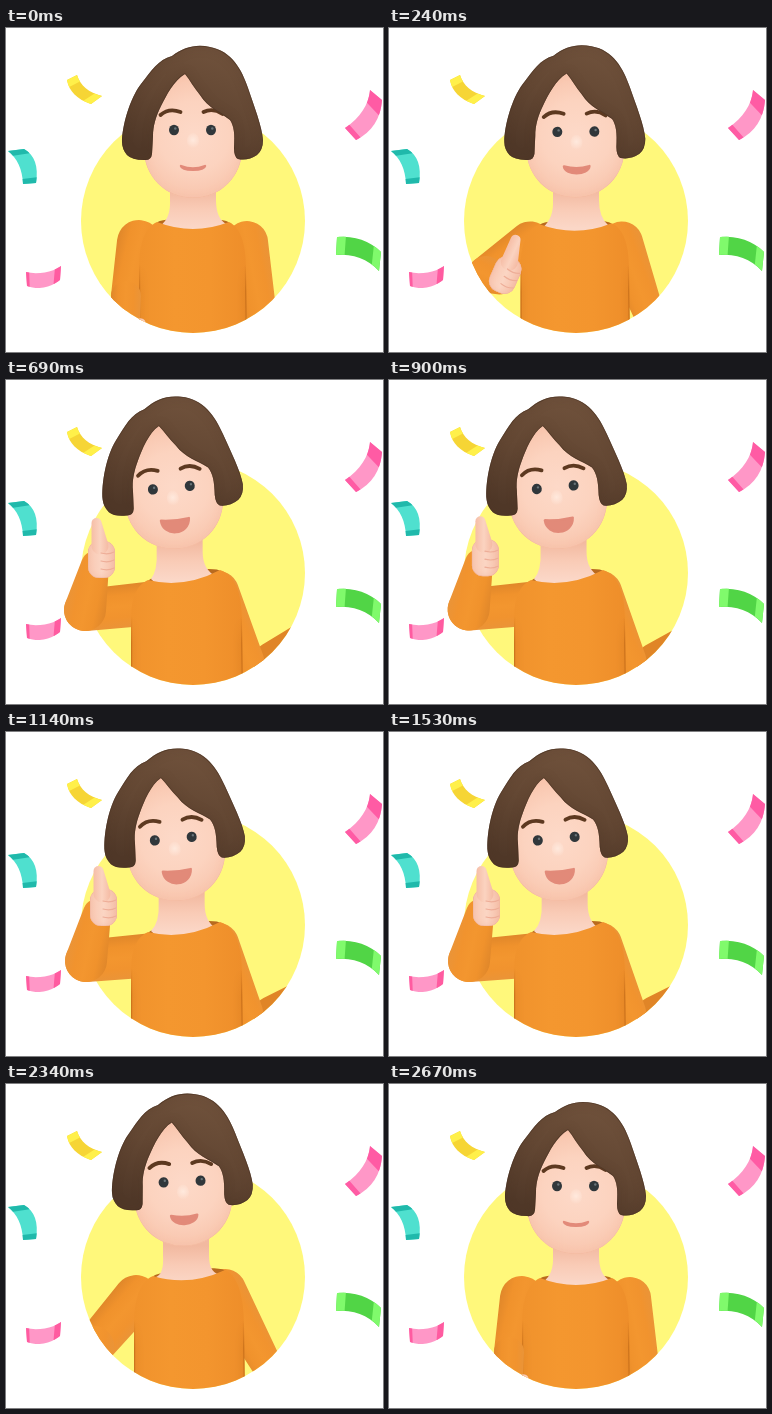
Write an HTML page with a canvas that moves like this. It is 377 by 324 pixels and loops after 2.7 s.

```html
<!DOCTYPE html>
<html lang="en">
<head>
<meta charset="utf-8">
<title>Thumbs up</title>
<style>
  html, body { margin: 0; width: 100%; height: 100%; overflow: hidden; background: #fff; }
  canvas { display: block; width: 377px; height: 324px; }
</style>
</head>
<body>
<canvas id="stage" width="377" height="324"></canvas>
<script>
const ctx = document.getElementById('stage').getContext('2d');
const LOOP = 2700;
const TAU = Math.PI * 2;

// head: dx, dy, degrees; face: dx, dy, mouth opening; collar: x, y, tilt; torso: left, right
// armL: shoulder, elbow, elbow radius; hand: x, y, degrees; armR: shoulder, elbow; foreR: two ends
const rest = {
  head: [0, 0, 0], face: [0, 0, 0], collar: [187, 194, 0], torso: [133, 240],
  armL: [133, 214, 120, 268, 15], hand: [124, 330, 24],
  armR: [241, 214, 256, 290], foreR: [256, 308, 258, 330]
};
const raise = {
  head: [-2.5, -1, -1.7], face: [2, 5, .8], collar: [186, 197, -3], torso: [129, 240],
  armL: [148, 218, 78, 229, 21], hand: [105, 179, 24],
  armR: [222, 215, 265, 286], foreR: [268, 308, 280, 322]
};
const thumbs = {
  head: [-20.5, -1, -5.5], face: [-1, 6.5, 1], collar: [178, 195, -10], torso: [125, 236],
  armL: [148, 223, 79, 230, 21], hand: [95, 179, 0],
  armR: [212, 212, 243, 280], foreR: [266, 281, 294, 264]
};
const settle = {
  head: [-18.5, -1, -5.5], face: [-1, 5.5, 1], collar: [178, 195, -10], torso: [125, 236],
  armL: [148, 223, 80, 229, 21], hand: [97, 175, 0],
  armR: [212, 212, 242, 280], foreR: [266, 283, 292, 270]
};
const lower = {
  head: [-10.5, -8, -2.7], face: [0, 3.5, .55], collar: [183, 189, -6], torso: [128, 238],
  armL: [130, 213, 88, 262, 20], hand: [86, 310, 24],
  armR: [219, 206, 263, 285], foreR: [264, 308, 276, 324]
};
const timeline = [
  [0, rest], [450, raise], [690, thumbs], [1140, settle],
  [1530, settle], [2100, settle], [2340, lower], [2670, rest], [LOOP, rest]
];

// Monotone cubic interpolation through the timeline
function poseAt(time) {
  const last = timeline.length - 2;
  let i = last;
  while (timeline[i][0] > time) i--;
  const value = (k, part, n) => timeline[k][1][part][n];
  const secant = (k, part, n) =>
    (value(k + 1, part, n) - value(k, part, n)) / (timeline[k + 1][0] - timeline[k][0]);
  const slope = (k, part, n) => {
    if (k === 0 || k > last) return 0;
    const a = secant(k - 1, part, n), b = secant(k, part, n);
    return a * b <= 0 ? 0 : 2 * a * b / (a + b);
  };
  const span = timeline[i + 1][0] - timeline[i][0];
  const u = (time - timeline[i][0]) / span, v = 1 - u;
  const pose = {};
  for (const part in rest) {
    pose[part] = rest[part].map((_, n) =>
      value(i, part, n) * v * v * (1 + 2 * u) + slope(i, part, n) * span * u * v * v +
      value(i + 1, part, n) * u * u * (3 - 2 * u) - slope(i + 1, part, n) * span * u * u * v);
  }
  return pose;
}

function gradient(x0, y0, x1, y1, ...colors) {
  const g = ctx.createLinearGradient(x0, y0, x1, y1);
  colors.forEach((c, i) => g.addColorStop(i / (colors.length - 1), c));
  return g;
}

function glow(x, y, r, ...colors) {
  const g = ctx.createRadialGradient(x, y, 0, x, y, r);
  colors.forEach((c, i) => g.addColorStop(i / (colors.length - 1), c));
  return g;
}

function fill(path, style) {
  ctx.fillStyle = style;
  ctx.fill(path);
}

// Soft dark edge on the inside of a path
function rim(path, style, shadow, width = 2, blur = 8) {
  ctx.save();
  ctx.clip(path);
  ctx.strokeStyle = style;
  ctx.lineWidth = width;
  ctx.shadowColor = shadow;
  ctx.shadowBlur = blur;
  ctx.stroke(path);
  ctx.restore();
}

function ellipse(x, y, rx, ry, style) {
  ctx.beginPath();
  ctx.ellipse(x, y, rx, ry, 0, 0, TAU);
  ctx.fillStyle = style;
  ctx.fill();
}

function line(d, color, width) {
  ctx.strokeStyle = color;
  ctx.lineWidth = width;
  ctx.stroke(new Path2D(d));
}

// Tapered limb with round ends
function limb(x0, y0, r0, x1, y1, r1) {
  const angle = Math.atan2(y1 - y0, x1 - x0);
  const ratio = (r0 - r1) / Math.max(1, Math.hypot(x1 - x0, y1 - y0));
  const spread = Math.acos(Math.max(-1, Math.min(1, ratio)));
  const path = new Path2D();
  path.arc(x0, y0, r0, angle + spread, angle - spread + TAU);
  path.arc(x1, y1, r1, angle - spread, angle + spread);
  path.closePath();
  return path;
}

function sleeve(x0, y0, r0, x1, y1, r1) {
  const angle = Math.atan2(y1 - y0, x1 - x0) + Math.PI / 2;
  const ox = Math.cos(angle) * r0, oy = Math.sin(angle) * r0;
  fill(limb(x0, y0, r0, x1, y1, r1),
    gradient(x0 - ox, y0 - oy, x0 + ox, y0 + oy, '#ea9438', '#f1932e', '#f3962f', '#f0922c', '#e0872a'));
}

// Ribbon between two quadratic edges: outer start, control, end, then inner
const ribbons = [
  [[71, 47, 76, 63, 96, 68], [61, 52, 64, 69, 85, 76], .22, .8, '#f6d535', '#fff04a'],
  [[18, 121, 34, 130, 30, 155], [2, 123, 16, 134, 17, 156], .2, .88, '#4fe0cf', '#20b9ab'],
  [[20, 244, 40, 248, 55, 238], [21, 258, 38, 264, 54, 252], .08, .8, '#ff97c7', '#ff5ba0'],
  [[364, 62, 362, 84, 339, 100], [376, 72, 374, 100, 350, 112], .3, .9, '#ff97c7', '#ff5ba4'],
  [[331, 209, 358, 207, 375, 224], [330, 227, 356, 225, 373, 243], .17, .8, '#51d546', '#80fa6c']
];

function strip(outer, inner, from, to, color) {
  const point = (e, t) => [0, 1].map(k =>
    e[k] * (1 - t) ** 2 + e[k + 2] * 2 * t * (1 - t) + e[k + 4] * t * t);
  ctx.beginPath();
  for (let i = 0; i <= 8; i++) ctx.lineTo(...point(outer, from + (to - from) * i / 8));
  for (let i = 8; i >= 0; i--) ctx.lineTo(...point(inner, from + (to - from) * i / 8));
  ctx.fillStyle = color;
  ctx.fill();
}

function drawRibbons() {
  for (const [outer, inner, a, b, main, end] of ribbons) {
    strip(outer, inner, 0, 1, main);
    strip(outer, inner, 0, a, end);
    strip(outer, inner, b, 1, end);
  }
}

function drawHand([x, y, degrees]) {
  ctx.save();
  ctx.translate(x, y);
  ctx.rotate(degrees * Math.PI / 180);
  const fist = new Path2D();
  fist.roundRect(-13, -18, 27, 37, 11);
  fill(fist, gradient(-13, 0, 14, 0, '#f9c8b2', '#fbd5c3', '#f6c0a9'));
  rim(fist, '#f0b49c', '#eba890', 1, 5);
  fill(limb(-1, -13, 8.5, -4.5, -36, 5), gradient(-9, 0, 7, 0, '#f6bfa8', '#fbd3c0', '#f5bca5'));
  for (const row of [-6, 2, 10]) line(`M0 ${row}Q7 ${row + 2} 13 ${row - 1}`, '#eeae98', 1.2);
  ctx.restore();
}

function drawBody({ head, collar, torso, armL, hand, armR, foreR }) {
  const [cx, cy, tilt] = collar, [left, right] = torso;
  const [sx, sy, ex, ey, er] = armL;
  ctx.save();
  const mask = new Path2D();
  mask.arc(187, 193, 112, 0, TAU);
  mask.rect(0, 0, 377, 165);
  if (hand[1] < 240) mask.rect(0, 0, 187, 257);
  ctx.clip(mask);

  fill(limb(foreR[0], foreR[1], 19, foreR[2], foreR[3], 19), '#e08527');
  sleeve(armR[0], armR[1], 21, armR[2], armR[3], 15);
  sleeve(sx, sy, 22, ex, ey, er);

  ctx.save();
  ctx.translate(cx, cy);
  ctx.rotate(Math.atan2(tilt, 72));
  ellipse(0, 1, 36, 5, '#b96a1e');
  ctx.restore();

  const nx = 187 + head[0] - head[2] * 1.3;
  fill(new Path2D(`M${nx - 23} 150V172Q${nx - 22} 190 ${cx - 33} ${cy + 4}L${cx - 20} ${cy + 16}` +
    `H${cx + 20}L${cx + 33} ${cy + 2}Q${nx + 23} 190 ${nx + 23} 172V150Z`),
    gradient(0, 162, 0, 200, '#f2b9a0', '#f9cbb6', '#fbd7c7'));

  const ly = cy - tilt / 2, ry = cy + tilt / 2;
  const shirt = new Path2D(`M${cx - 36} ${ly}Q${cx} ${cy + 14} ${cx + 36} ${ry}` +
    `C${right - 4} ${ry + 6} ${right} 220 ${right} 240L${right + 1} 315H${left}V242` +
    `C${left} 220 ${left + 4} ${ly + 6} ${cx - 36} ${ly}Z`);
  fill(shirt, gradient(left, 0, right, 0, '#f0922c', '#f4972f', '#f3952e', '#ee8e2a'));
  const seam = gradient(0, 236, 0, 264, 'rgba(196,108,24,0)', 'rgba(196,108,24,.75)');
  rim(shirt, seam, '#c87018', 2.5, 8);

  sleeve(ex, ey, er, hand[0] - 6, hand[1] + 6, 14);
  drawHand(hand);
  ctx.restore();
}

const skin = new Path2D('M138 95V121C138 149 160 170 187 170C214 170 236 149 236 121V95Q215 50 177 44Q145 60 138 95Z');
const hair = new Path2D('M179 46C168 52 160 68 155 78C150 88 147 98 147 108L146 126Q145 133 138 132' +
  'Q126 132 121 127Q116 121 116 114C116 98 124 70 135 56C146 42 152 32 166 28' +
  'C178 19 190 16 204 19C226 23 236 42 242 60C248 78 256 98 257 112Q257 122 251 127' +
  'Q242 133 232 131Q228 129 228 120C229 106 228 98 224 92C214 84 202 80 194 67C188 60 184 52 179 46Z');

function drawHead({ head, face }) {
  ctx.save();
  ctx.translate(187 + head[0], 105 + head[1]);
  ctx.rotate(head[2] * Math.PI / 180);
  ctx.translate(-187, -105);
  fill(skin, glow(188, 108, 70, '#fdd9c8', '#fcd3bf', '#f7c1a8'));
  rim(skin, '#f3b9a0', '#f1b298', 1, 7);

  ctx.save();
  ctx.translate(face[0], face[1]);
  ellipse(187, 113, 6, 8, glow(187, 112, 8, '#ffe9dd', 'rgba(255,233,221,0)'));
  for (const x of [168, 205]) {
    ellipse(x, 102, 5, 5.2, '#30373b');
    ellipse(x + 1.3, 100.5, 1.2, 1.2, '#69757a');
  }
  line('M154.500 87Q163 79.500 174.500 84', '#5d3920', 3.8);
  line('M197.500 84Q207 79.500 216.500 86', '#5d3920', 3.8);

  const open = face[2];
  const w = 12 + open * 2, top = 138 - open * 4;
  const lips = new Path2D(`M${187 - w} ${top}Q187 ${top + 5 - 3 * open} ${187 + w} ${top}` +
    `C${187 + w - 1} ${top + 5 + open * 12} ${187 - w + 1} ${top + 5 + open * 12} ${187 - w} ${top}Z`);
  fill(lips, '#e28a79');
  ctx.strokeStyle = '#e28a79';
  ctx.lineWidth = 2.4;
  ctx.stroke(lips);
  ctx.restore();

  fill(hair, gradient(205, 18, 165, 130, '#70523c', '#634733', '#503828'));
  rim(hair, 'rgba(70,47,33,.6)', '#493122', 1.5, 8);
  ctx.restore();
}

function draw() {
  const pose = poseAt(performance.now() % LOOP);
  ctx.fillStyle = '#fff';
  ctx.fillRect(0, 0, 377, 324);
  ctx.lineCap = ctx.lineJoin = 'round';
  drawRibbons();
  ellipse(187, 193, 112, 112, '#fff87b');
  drawBody(pose);
  drawHead(pose);
  requestAnimationFrame(draw);
}
draw();
</script>
</body>
</html>
```
